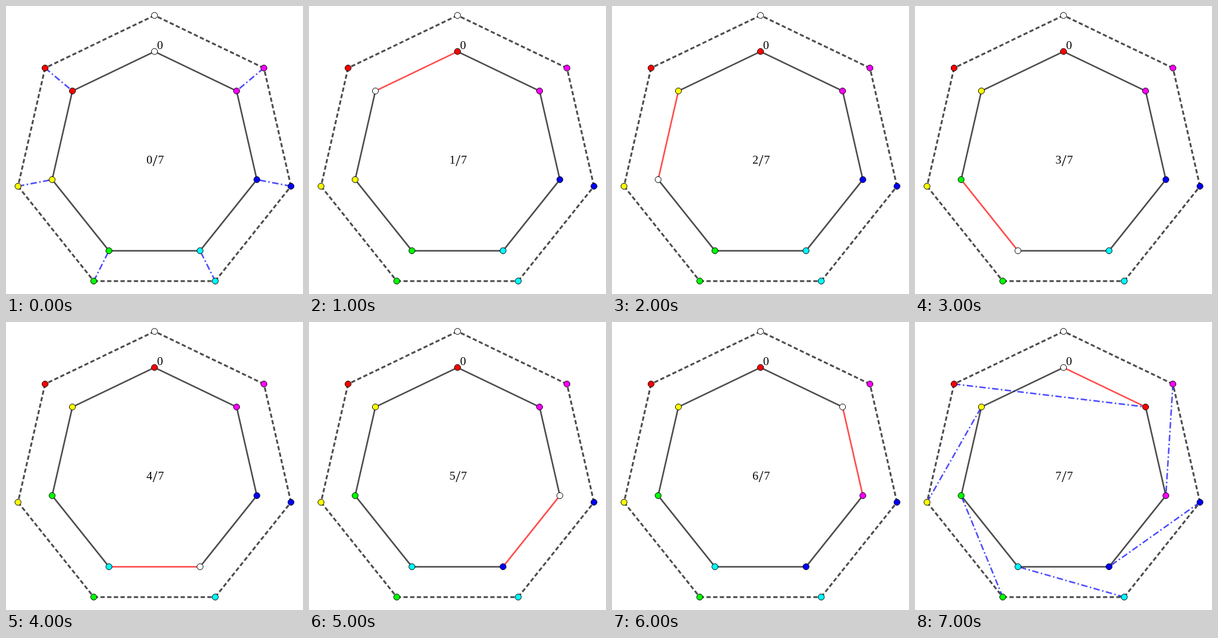
These frames come from a looping animation (489 px wide and 475 px high, 8000 ms). An HTML page:

```html
<!DOCTYPE html>
<html lang="en">
<head>
<meta charset="utf-8">
<title>Heptagon shift</title>
<style>
html, body { margin: 0; width: 100%; height: 100%; overflow: hidden; background: #fff; }
svg { display: block; width: 100%; height: 100%; }
line { stroke: #000; stroke-width: 2.5; stroke-opacity: .7; }
.outer line { stroke-width: 3; stroke-dasharray: 7 4; }
.links line { stroke: #00f; stroke-dasharray: 10.5 4 2.5 4; }
circle { stroke: #000; stroke-width: 1; }
text { font: 19.5px "Liberation Serif", serif; text-anchor: middle; }
.slash { font-size: 28px; }
</style>
</head>
<body>
<svg id="stage" viewBox="0 0 489 475"></svg>
<script>
const N = 7, STEP = 1000;
const COLORS = ['#fff', '#f00', '#ff0', '#0f0', '#0ff', '#00f', '#f0f'];
const stage = document.getElementById('stage');

function add(parent, tag, attrs = {}, text = '') {
  const el = document.createElementNS('http://www.w3.org/2000/svg', tag);
  for (const key in attrs) el.setAttribute(key, attrs[key]);
  el.textContent = text;
  return parent.appendChild(el);
}

// Vertices run counterclockwise from the top.
function heptagon(cy, side) {
  const r = side / (2 * Math.sin(Math.PI / N));
  return COLORS.map((_, i) => {
    const a = 2 * Math.PI * i / N;
    return { x: 244.5 - r * Math.sin(a), y: cy - r * Math.cos(a) };
  });
}

function join(el, p, q) {
  el.setAttribute('x1', p.x);
  el.setAttribute('y1', p.y);
  el.setAttribute('x2', q.x);
  el.setAttribute('y2', q.y);
}

function edges(points, name) {
  const group = add(stage, 'g', { class: name });
  return points.map((p, i) => {
    const el = add(group, 'line');
    join(el, p, points[(i + 1) % N]);
    return el;
  });
}

function dots(points) {
  return points.map((p, i) =>
    add(stage, 'circle', { cx: p.x, cy: p.y, r: 5, fill: COLORS[i] }));
}

const outer = heptagon(246, 200);
const inner = heptagon(247.9, 150);

edges(outer, 'outer');
const sides = edges(inner, 'inner');
const linkGroup = add(stage, 'g', { class: 'links' });
const links = COLORS.slice(1).map(() => add(linkGroup, 'line'));
dots(outer);
const beads = dots(inner);

add(stage, 'text', { x: 253.7, y: 70.5 }, '0');
const count = add(stage, 'text', { x: 236, y: 260 });
add(stage, 'text', { x: 245.4, y: 263.8, class: 'slash' }, '/');
add(stage, 'text', { x: 255, y: 260 }, '7');

// White trades places with its next neighbour at every step.
function arrange(step) {
  const order = COLORS.map((_, i) => i);
  for (let k = 0; k < step; k++) {
    const next = (k + 1) % N;
    [order[k], order[next]] = [order[next], order[k]];
  }
  return order;
}

let shown = -1;
function draw(time) {
  const step = Math.floor(time / STEP) % (N + 1);
  if (step === shown) return;
  shown = step;
  const order = arrange(step);
  count.textContent = step;
  beads.forEach((el, i) => el.setAttribute('fill', COLORS[order[i]]));
  sides.forEach((el, i) => { el.style.stroke = i === step - 1 ? '#f00' : '#000'; });
  linkGroup.style.display = step % N === 0 ? '' : 'none';
  links.forEach((el, i) => join(el, outer[i + 1], inner[order.indexOf(i + 1)]));
}

const start = performance.now();
function tick() {
  draw(performance.now() - start);
  requestAnimationFrame(tick);
}
tick();
</script>
</body>
</html>
```
